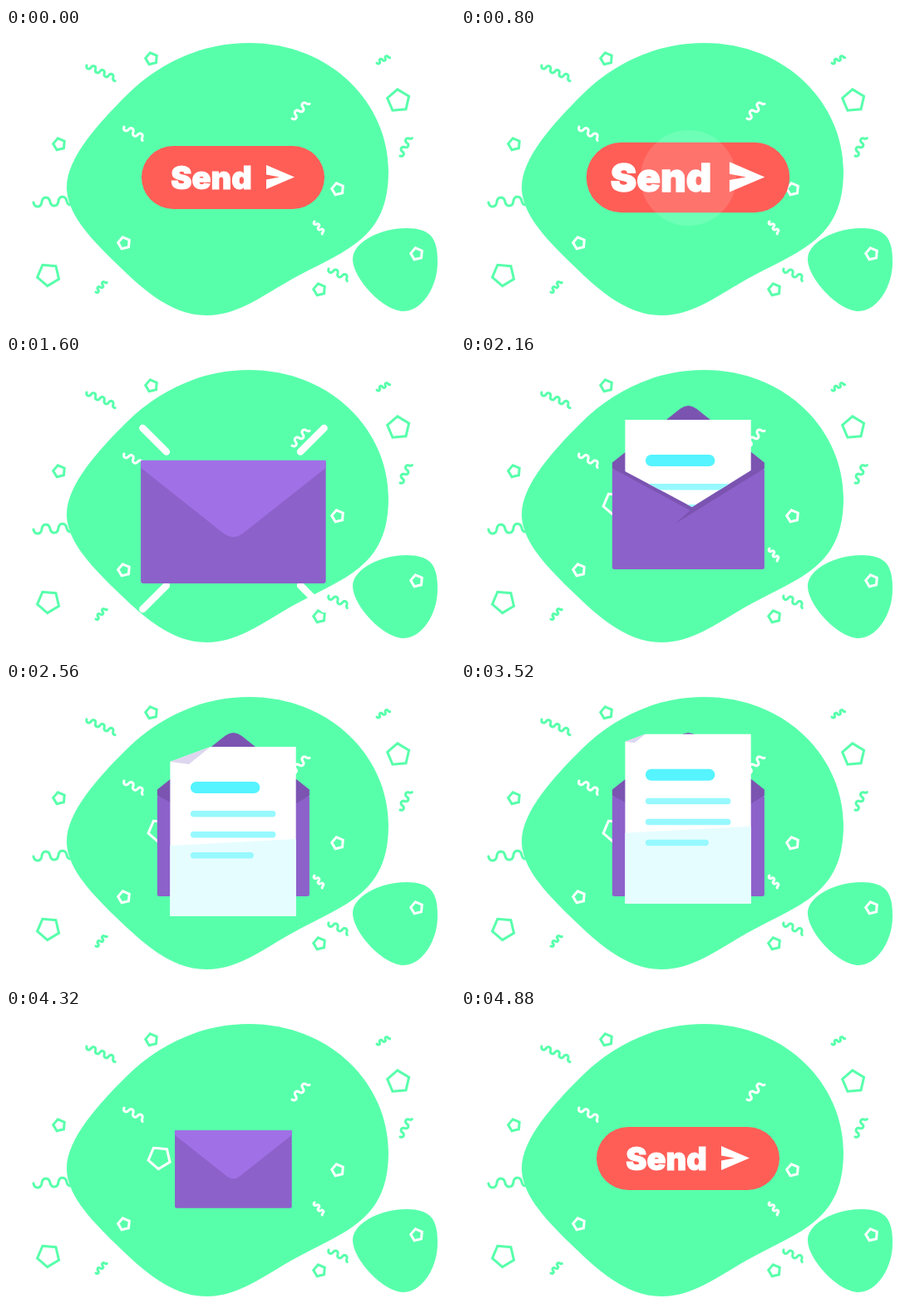
Recreate the animation shown at these times as an HTML page. Size 540 by 360 pixels, loop 5.04 s.

```html
<!DOCTYPE html>
<html lang="en">
<head>
<meta charset="utf-8">
<title>Send</title>
<style>
html, body { margin: 0; width: 100%; height: 100%; overflow: hidden; background: #fff; }
svg { display: block; width: 540px; height: 360px; }
text { font: 900 38px Inter, "Open Sans", sans-serif; text-anchor: middle; stroke: #fff; stroke-width: 1.1; }
</style>
</head>
<body>
<svg viewBox="0 0 540 360">
  <defs>
    <clipPath id="pocket"><path d="M-80-250V-41L4.5 4 80-43V-250Z"/></clipPath>
  </defs>
  <g fill="#58ffab">
    <path d="M292 18C392 18 460 92 460 172C460 252 412 266 352 298C312 319 282 346 241 346C196 346 160 310 130 281C100 252 73 222 73 192C73 156 112 114 144 82C184 42 236 18 292 18Z"/>
    <path d="M417 278C417 258 450 241 482 241C513 241 519 256 519 282C519 312 500 341 478 341C454 341 417 302 417 278Z"/>
  </g>
  <g id="confetti" fill="none" stroke-width="3" stroke-linecap="round"></g>
  <path id="burst" stroke="#fff" stroke-width="8.5" stroke-linecap="round"/>

  <g id="envelope">
    <rect x="-91.5" y="-42.5" width="183" height="121.5" rx="2.5" fill="#8d61ca"/>
    <path d="M-91.5-42.5 2 8-15.5 24 91.5-42.5Z" fill="#7b54b1"/>
    <path id="flap" d="M-91.5-.5V7L-9.5 72Q0 79 9.5 72L91.5 7V-.5Z"/>
    <g id="slot">
      <g id="letter">
        <path id="paper" fill="#fff"/>
        <path d="M-76 18 75.3 10V103H-76Z" fill="#e6fdff"/>
        <path id="fold" d="M0 18 22.5 21 48.5 0Z" fill="#ded6ef"/>
        <rect x="-51.5" y="-59" width="83.5" height="14" rx="7" fill="#55f4ff"/>
        <g fill="#97f9ff">
          <rect x="-51.5" y="-24" width="102.5" height="7.5" rx="3.7"/>
          <rect x="-51.5" y="1" width="102.5" height="7.5" rx="3.7"/>
          <rect x="-51.5" y="26" width="76" height="7.5" rx="3.7"/>
        </g>
      </g>
    </g>
  </g>

  <rect id="button" x="-110" y="-38" width="220" height="76" rx="38" fill="#ff5e57"/>
  <g id="label" fill="#fff">
    <text x="-26" y="13.5">Send</text>
    <path d="M40-15 74-.5 40 14V2.5L56-.5 40-3.5Z"/>
  </g>
  <circle id="ripple" cx="273.5" cy="180.5" fill="none" stroke="#fff" stroke-opacity=".13"/>
</svg>
<script>
const $ = id => document.getElementById(id);
const set = (id, name, value) => $(id).setAttribute(name, value);
const show = (id, on) => set(id, 'display', on ? 'inline' : 'none');
const place = (id, x, y, s) => set(id, 'transform', `translate(${x} ${y}) scale(${s})`);
const GREEN = '#58ffab', WHITE = '#fff', LOOP = 5040, STEP = 80;

function addConfetti(d, color) {
  const path = document.createElementNS('http://www.w3.org/2000/svg', 'path');
  path.setAttribute('d', d);
  path.setAttribute('stroke', color);
  $('confetti').append(path);
}

function pentagon(color, x, y, r = 7.3, degrees = 185) {
  const points = [0, 1, 2, 3, 4].map(i => {
    const a = (degrees + i * 72) * Math.PI / 180;
    return `${x + r * Math.cos(a)} ${y + r * Math.sin(a)}`;
  });
  addConfetti(`M${points.join('L')}Z`, color);
}

// A wave with rounded crests; its height follows from its wavelength.
function squiggle(color, x1, y1, x2, y2, waves = 2.2) {
  const dx = x2 - x1, dy = y2 - y1, points = [];
  for (let i = 0; i <= 60; i++) {
    const a = i / 60 * waves * 2 * Math.PI;
    const u = (a - .3 * Math.sin(2 * a)) / (waves * 2 * Math.PI);
    const v = .26 / waves * Math.sin(a);
    points.push(`${x1 + dx * u - dy * v} ${y1 + dy * u + dx * v}`);
  }
  addConfetti(`M${points.join('L')}`, color);
}

pentagon(GREEN, 175, 37);
pentagon(GREEN, 64, 140);
pentagon(GREEN, 377, 315);
pentagon(GREEN, 472, 87.5, 13.7, -95);
pentagon(GREEN, 51, 297, 13.7, 95);
pentagon(WHITE, 142, 259);
pentagon(WHITE, 399, 194);
pentagon(WHITE, 494, 272);
pentagon(WHITE, 184.5, 179, 13.7, 95);

squiggle(GREEN, 97, 45, 132, 61, 3.3);
squiggle(GREEN, 446, 42, 461, 34);
squiggle(GREEN, 474, 154, 486, 131);
squiggle(GREEN, 33, 210, 77, 208);
squiggle(GREEN, 108, 318, 120, 305);
squiggle(GREEN, 388, 290, 412, 302);
squiggle(WHITE, 142, 119, 166, 133);
squiggle(WHITE, 344, 109, 363, 89);
squiggle(WHITE, 371, 233, 382, 247);

const ramp = (t, from, to) => Math.min(1, Math.max(0, (t - from) / (to - from)));
const easeOut = x => Math.sin(x * Math.PI / 2);
const bump = x => Math.sin(x * Math.PI);
// Eases from 0 to 1, overshooting by a quarter unless told otherwise.
const pop = (x, c = 3) => 1 + (c + 1) * (x - 1) ** 3 + c * (x - 1) ** 2;

function drawButton(t) {
  show('button', t < 1440 || t >= 4400);
  show('label', t < 1440 || t >= 4400);
  const size = t < 3000 ? pop(1 - ramp(t, 1280, 1440)) : pop(ramp(t, 4400, 4880));
  const press = bump(ramp(t, 720, 1280));
  place('button', 273, 180, size + .256 * press);
  place('label', 273, 180, size + .57 * press);

  const outer = 150 * easeOut(ramp(t, 720, 1040)), inner = 150 * ramp(t, 800, 1110);
  show('ripple', outer > inner);
  set('ripple', 'r', (outer + inner) / 2);
  set('ripple', 'stroke-width', outer - inner);
}

function drawBurst(t) {
  const [begin, cy, reach] = t < 3000 ? [1440, 197, 136] : [4400, 180, 126];
  const x = ramp(t, begin, begin + 270);
  const inner = reach * x, outer = reach * easeOut(x);
  show('burst', x > 0 && x < 1);
  set('burst', 'd', [[-1, -1], [1, -1], [-1, 1], [1, 1]].map(([sx, sy]) =>
    `M${273.5 + sx * inner} ${cy + sy * inner}L${273.5 + sx * outer} ${cy + sy * outer}`).join(''));
}

function drawEnvelope(t) {
  show('envelope', t >= 1440 && t < 4400);
  const size = t < 3000 ? pop(ramp(t, 1440, 1840)) : pop(1 - ramp(t, 4020, 4380));
  place('envelope', 273.4, 179, size + .14 * bump(ramp(t, 3840, 4000)));

  const flap = 1 - 2 * ramp(t, 1840, 2080) + 2 * ramp(t, 4000, 4240);
  set('flap', 'transform', `translate(0 -42.5) scale(1 ${flap})`);
  set('flap', 'fill', flap > 0 ? '#a071e6' : '#7b54b1');

  const out = t < 3000 ? ramp(t, 2080, 2560) : 1 - ramp(t, 3440, 3866);
  const fold = ramp(t, 2400, 2560) - ramp(t, 3440, 3600);
  show('slot', out > 0);
  set('slot', 'clip-path', t >= 2480 && t < 3680 ? 'none' : 'url(#pocket)');
  place('letter', 0, 112 * (1 - pop(out, 5)), 1);
  set('paper', 'd', `M-76 ${-101 + 18 * fold}L${-76 + 48.5 * fold}-101H75.3V103H-76Z`);
  place('fold', -76, -101, fold);
}

const start = performance.now();
function frame() {
  const now = (performance.now() - start) % LOOP;
  const t = Math.floor(now / STEP) * STEP; // 12.5 poses a second
  drawButton(t);
  drawBurst(t);
  drawEnvelope(t);
  requestAnimationFrame(frame);
}
frame();
</script>
</body>
</html>
```
